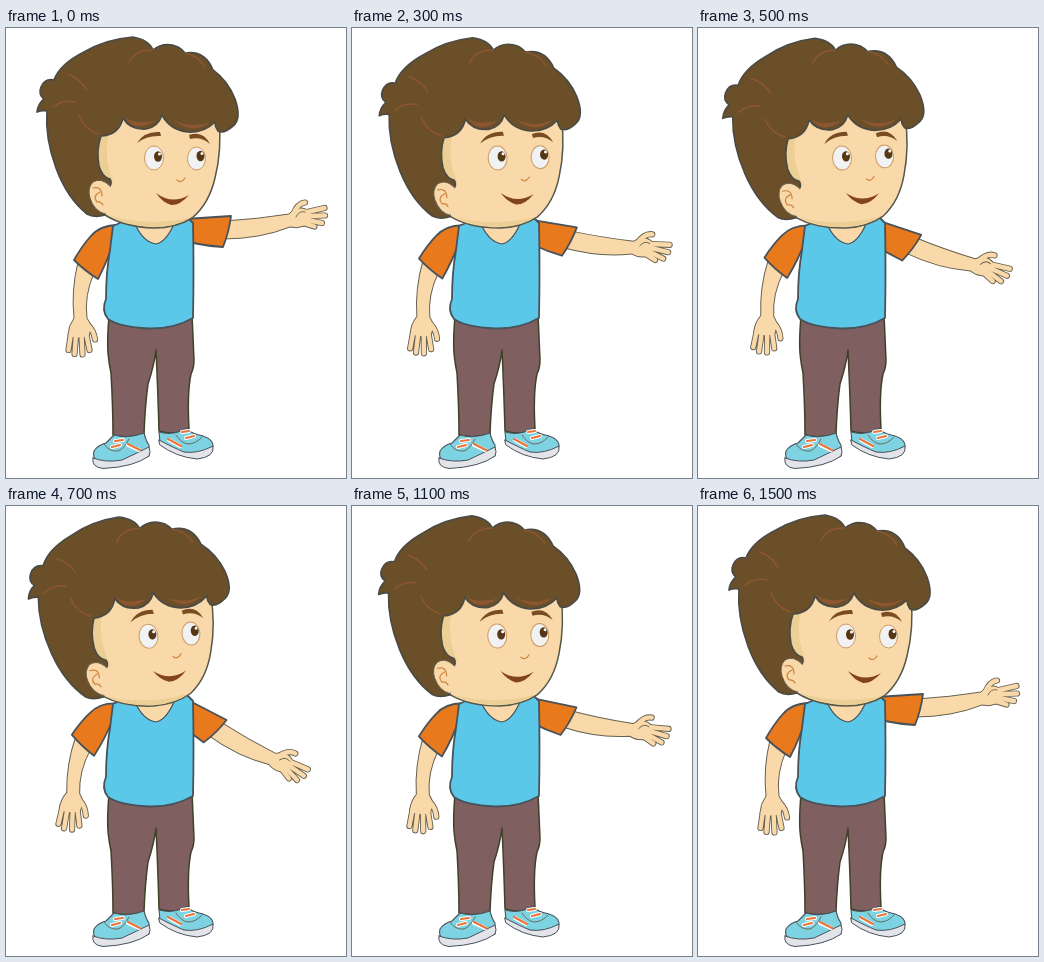
Write an HTML page that moves like this. It is 340 by 450 pixels and loops after 1600 ms.

```html
<!DOCTYPE html>
<html lang="en">
<head>
<meta charset="utf-8">
<title>Boy waving his arm</title>
<style>
  html, body { margin: 0; width: 100%; height: 100%; overflow: hidden; background: #fff; }
  svg { display: block; width: 340px; height: 450px; }
  path { stroke-linecap: round; stroke-linejoin: round; }
  .skin { fill: #f9d9a9; stroke: #66604f; stroke-width: 1; }
  .cloth { stroke: #48525a; stroke-width: 1.8; }
  .orange { fill: #e8791c; }
  .edge { fill: none; stroke: #66604f; stroke-width: 6.2; }
  .finger { fill: none; stroke: #f9d9a9; stroke-width: 4.4; }
  .crease { fill: none; stroke: #66604f; stroke-width: .9; }
  .hair { fill: #6b4f29; stroke: #4a4b45; stroke-width: 1.7; }
  .strand { fill: none; stroke: #8d5630; stroke-width: 1.5; }
  .feature { fill: none; stroke: #cf8440; stroke-width: 1.2; }
  .brow { fill: #7a4c22; }
  .shade { fill: #eccf94; }
  .shoe { fill: #7ed3e3; stroke: #48525a; stroke-width: 1.1; }
  .sole { fill: #e3e4ea; stroke: #48525a; stroke-width: 1; }
  .lace { fill: none; stroke: #fff; stroke-width: 4; }
  .stripe { fill: none; stroke: #e8743b; stroke-width: 2.2; }
</style>
</head>
<body>
<svg viewBox="0 0 340 450">
  <defs>
    <path id="leftFingers" d="M65 305L62.500 322M70 307L68.500 326M75.500 307L76.500 326.500M80 305L83.500 322M82 297Q88 303 89 311.500"/>
    <path id="rightFingers" d="M301 184L318.500 180M303 188L319 187.500M301 192L316 195M297 195L308.500 198.500M287 187Q291 175.500 299 174.500"/>
  </defs>

  <!-- legs and shoes -->
  <path class="cloth" fill="#805f60" style="stroke:#3f4128;stroke-width:1.500" d="M103 288Q101 312 102 325Q103 336 105 345Q107 380 107 407Q122 411 138 406Q139 378 142 356Q148 338 150 322Q152 365 153 403Q168 408 183 401Q181 365 185 346Q188 340 188 332L186 286Z"/>
  <path class="shoe" d="M108 407Q123 411 138 405Q140 413 143 417L143 428Q122 438 92 434Q86 430 88 423Q92 417 100 415Z"/>
  <path class="sole" d="M87 430Q100 435 116 432Q131 425 143 419Q145 424 143 428Q128 439 97 440.500Q85 439 87 430Z"/>
  <path class="crease" d="M98 416Q103 424 112 423Q118 421 123 411"/>
  <path class="lace" d="M109 413L117 412M106 419L114 417M122 417L133 422"/>
  <path class="stripe" d="M109 413L117 412M106 419L114 417M122 416L134 422"/>
  <path class="shoe" d="M153 404Q168 408 181 400Q184 405 193 407Q207 410 207 418Q206 425 192 427Q167 424 154 414Z"/>
  <path class="sole" d="M153 412Q168 420 178 424Q192 426 207 418Q209 429 191 431Q170 429 154 417Z"/>
  <path class="crease" d="M170 407Q175 415 182 416Q190 416 196 409"/>
  <path class="lace" d="M176 404L183 403M180 410L188 408M163 412L174 418"/>
  <path class="stripe" d="M176 404L183 403M180 410L188 408M162 411L175 418"/>

  <!-- arms -->
  <g id="leftArm">
    <use href="#leftFingers" class="edge"/>
    <path class="skin" d="M72 234Q65 262 68 290Q62 298 62 308Q72 312 83 308Q87 298 81 290Q78 268 88 245"/>
    <use href="#leftFingers" class="finger"/>
    <path class="cloth orange" d="M112 197Q94 197 84 209Q76 218 68 232Q79 243 92 251Q102 232 108 212Z"/>
  </g>
  <g id="rightArm">
    <g id="forearm">
      <use href="#rightFingers" class="edge"/>
      <path class="skin" d="M219 193Q252 191 283 186Q289 179 296 180Q303 181 304 187Q304 195 298 198Q291 201 284 199Q254 211 217 211"/>
      <use href="#rightFingers" class="finger"/>
      <path class="crease" d="M299 184Q293 182 290 189"/>
    </g>
    <path class="cloth orange" d="M176 191L187 190.500L225 188Q223 204 217 219Q201 218 187 215L174 212Z"/>
  </g>

  <!-- shirt -->
  <path class="cloth" fill="#5cc8e9" d="M107 198Q118 194 125 186L180 188L187 195Q188 245 187 290Q168 301 143 300.500Q113 299 102 291Q95 282 100 271Q100 245 104 222Z"/>
  <path class="cloth skin" style="stroke-width:1.200" d="M129 196Q137 214 150 216Q160 214 168 196Z"/>

  <g id="head">
    <path class="skin" style="stroke:#55584a;stroke-width:1.500" d="M92 106L120 85L213 92Q216 122 209 150Q203 176 186 190Q170 200 148 200Q118 199 99 187L95 170Z"/>
    <path class="shade" d="M92 107Q88 122 93 140L108 156Q97 130 103 106ZM102 187Q140 199 184 190Q168 199 148 199Q122 198 102 187Z"/>
    <path class="hair" d="M31 84Q32 76 38 71Q32 66 35 59Q39 50 48 52Q54 36 78 24Q100 11 127 9Q143 12 147 22Q158 13 172 19Q177 22 179 25Q199 22 207 42Q222 53 229 71Q236 91 227 98Q218 106 212 103Q209 99 209 94Q198 105 182 104Q164 102 156 87Q152 99 140 101Q124 102 117 90Q113 107 95 108Q90 122 93 138Q96 149 104 151Q106 155 104 158Q88 160 90 176L99 187Q88 190 81 186Q61 170 50 140Q39 110 41 83Q36 82 31 84Z"/>
    <path class="strand" d="M47 79Q57 71 69 74M62 46Q73 50 80 61M73 87Q78 101 92 106M123 34Q130 21 147 22M179 25Q191 27 199 39"/>
    <path fill="#8d5630" d="M118 88Q126 97 149 93Q128 106 118 88ZM168 92Q184 101 204 94Q186 108 168 92Z"/>
    <path class="skin" d="M104 158Q95 149 87 154Q81 160 84 170Q88 183 99 186"/>
    <path class="feature" d="M87 160Q96 158 96 168M94 164Q86 168 91 174Q95 173 97 177M171 152Q175 156 179 150"/>
    <g fill="#f1f2f3" stroke="#cf9a60">
      <ellipse cx="148" cy="130" rx="9.500" ry="12"/>
      <ellipse cx="190.500" cy="130.500" rx="9" ry="11.500"/>
    </g>
    <g fill="#553716">
      <ellipse cx="152" cy="128.500" rx="4" ry="5.200"/>
      <ellipse cx="194.500" cy="128" rx="4" ry="5.200"/>
    </g>
    <g fill="#fff">
      <circle cx="153.500" cy="126" r="1.500"/>
      <circle cx="196" cy="125.500" r="1.500"/>
    </g>
    <path class="brow" d="M131 115Q138 103 154 104L155 108Q141 107 131 115ZM183 107Q197 102 204 116Q195 108 184 111Z"/>
    <path fill="#83431b" d="M150 165Q166 177 183 167Q174 177.500 165 177Q156 174 150 165Z"/>
  </g>
</svg>
<script>
  const rotate = (id, angle, x, y) =>
    document.getElementById(id).setAttribute('transform', `rotate(${angle} ${x} ${y})`);

  // Sixteen 100 ms poses: seven steps down, eight steps back up.
  function draw() {
    const step = Math.floor(performance.now() / 100) % 16;
    const lowered = step < 7 ? step / 7 : (15 - step) / 8;
    rotate('head', -4.2 * lowered, 148, 205);
    rotate('leftArm', 5 * lowered, 105, 205);
    rotate('rightArm', 31 * lowered, 176, 193);
    rotate('forearm', 5 * lowered, 222, 203);
    requestAnimationFrame(draw);
  }
  draw();
</script>
</body>
</html>
```
